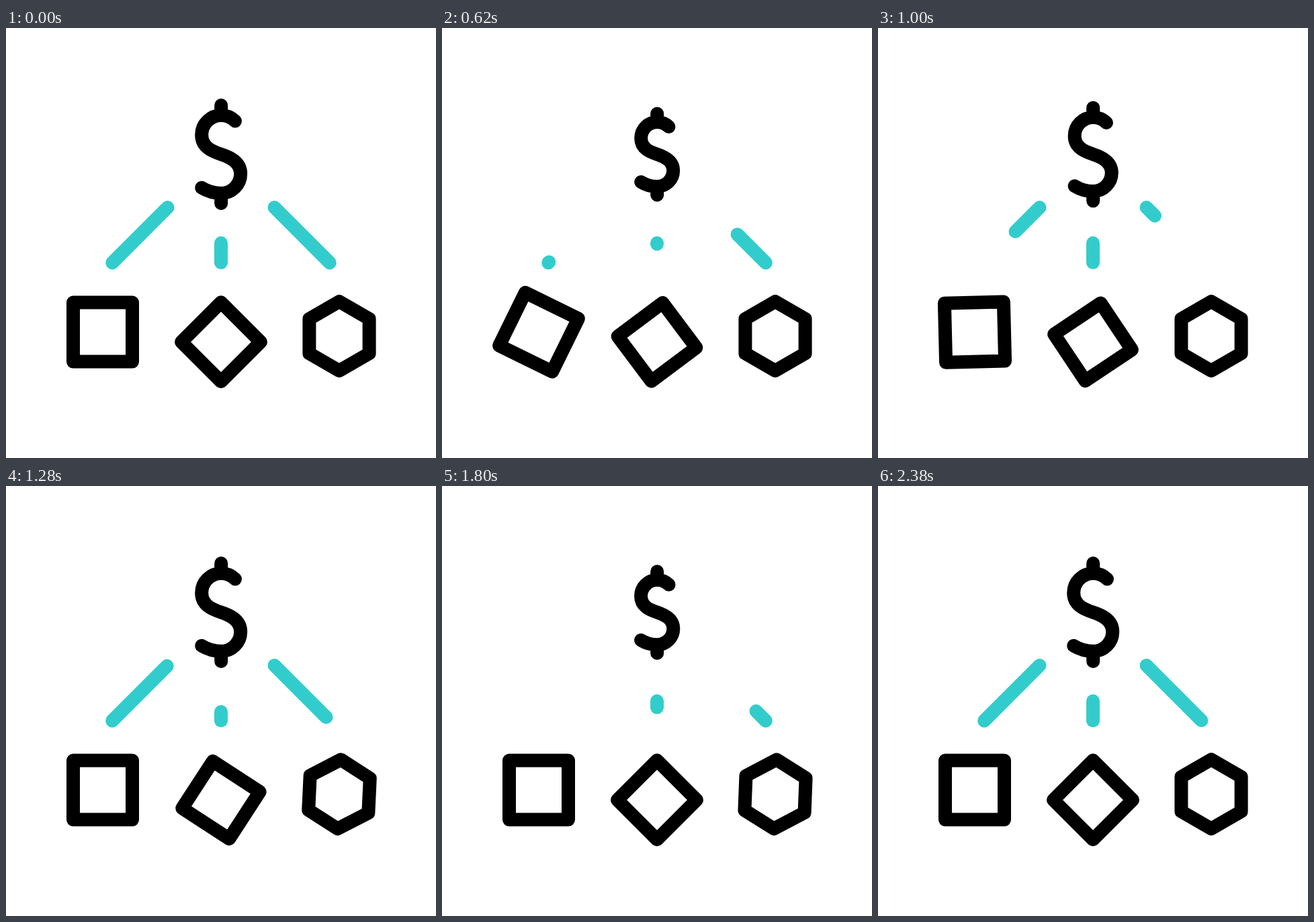
Write an HTML page with a canvas that moves like this. It is 640 by 640 pixels and loops after 2400 ms.

```html
<!DOCTYPE html>
<html lang="en">
<head>
<meta charset="utf-8">
<title>Dollar and shapes</title>
<style>
  html, body { margin: 0; width: 100%; height: 100%; overflow: hidden; background: #fff; }
  canvas { display: block; width: 640px; height: 640px; }
</style>
</head>
<body>
<canvas id="stage" width="640" height="640"></canvas>
<script>
const ctx = document.getElementById('stage').getContext('2d');
const LOOP = 2400;
const BLACK = '#000';
const TEAL = '#33cccc';
const STROKE = 20;

const progress = (t, from, to) => Math.min(1, Math.max(0, (t - from) / (to - from)));
const smooth = x => x * x * (3 - 2 * x);
const ramp = (t, from, to) => smooth(progress(t, from, to));

// Symmetric cubic-bezier(a, 0, 1 - a, 1), solved by bisection.
function strongEase(x, a = 0.53) {
  let lo = 0, hi = 1;
  for (let i = 0; i < 24; i++) {
    const s = (lo + hi) / 2;
    const bx = 3 * a * s * (1 - s) ** 2 + 3 * (1 - a) * s * s * (1 - s) + s ** 3;
    if (bx < x) lo = s; else hi = s;
  }
  return smooth((lo + hi) / 2);
}

const SPIN = 1080;
const shapes = [
  { x: 144, y: 452.6, r: 44 * Math.SQRT2, sides: 4, tilt: Math.PI / 4, start: 5 },
  { x: 320, y: 467.3, r: 59, sides: 4, tilt: 0, start: 429 },
  { x: 496, y: 458.7, r: 51.5, sides: 6, tilt: 0, start: 1166 }
];

// Each cycle: [hide from, hide to, show from, show to]
const lines = [
  { from: [240.5, 267], to: [158.2, 349.4], cycles: [[187, 653, 788, 1253], [1253, 1720, 1854, 2321]] },
  { from: [320, 320], to: [320, 349.3], cycles: [[0, 405, 556, 1023], [1066, 1471, 1622, 2089]] },
  { from: [399.5, 267], to: [481.8, 349.4], cycles: [[392, 858, 886, 1353], [1458, 1925, 1953, 2400]] }
];

const pulses = [[275, 630, 630, 1205], [1375, 1740, 1740, 2335]];
const MIN_SCALE = 0.827;

const dollar = new Path2D(
  'M0-73V-58M0 58V73' +
  'M20.8-49.5C15.5-54.9 8.1-58 0-58C-16-58-29-45-29-29' +
  'C-29-10-12-4 0 0C12 4 29 11 29 29' +
  'C29 45 16 58 0 58C-10.5 58-20.5 55-29 49.8');

function drawDollar(t) {
  const [a, b, c, d] = pulses[t < 1300 ? 0 : 1];
  const squeeze = ramp(t, a, b) - ramp(t, c, d);
  const scale = 1 - (1 - MIN_SCALE) * squeeze;
  const path = new Path2D();
  path.addPath(dollar, new DOMMatrix().translate(320.2, 188).scale(scale));
  ctx.stroke(path);
}

function drawShape({ x, y, r, sides, tilt, start }, t) {
  const turn = tilt - Math.PI / 2 + Math.PI * strongEase(progress(t, start, start + SPIN));
  ctx.beginPath();
  for (let i = 0; i < sides; i++) {
    const angle = turn + i * 2 * Math.PI / sides;
    ctx.lineTo(x + r * Math.cos(angle), y + r * Math.sin(angle));
  }
  ctx.closePath();
  ctx.stroke();
}

function drawLine({ from, to, cycles }, t) {
  const [a, b, c, d] = cycles[t < cycles[1][0] ? 0 : 1];
  const head = t < c ? ramp(t, a, b) : 0;
  const tail = t < c ? 1 : ramp(t, c, d);
  if (tail <= head) return;
  const at = k => [from[0] + (to[0] - from[0]) * k, from[1] + (to[1] - from[1]) * k];
  ctx.beginPath();
  ctx.moveTo(...at(head));
  ctx.lineTo(...at(tail));
  ctx.stroke();
}

function draw() {
  const t = performance.now() % LOOP;
  ctx.fillStyle = '#fff';
  ctx.fillRect(0, 0, 640, 640);
  ctx.lineWidth = STROKE;
  ctx.lineCap = ctx.lineJoin = 'round';
  ctx.strokeStyle = TEAL;
  lines.forEach(line => drawLine(line, t));
  ctx.strokeStyle = BLACK;
  shapes.forEach(shape => drawShape(shape, t));
  drawDollar(t);
  requestAnimationFrame(draw);
}
draw();
</script>
</body>
</html>
```
